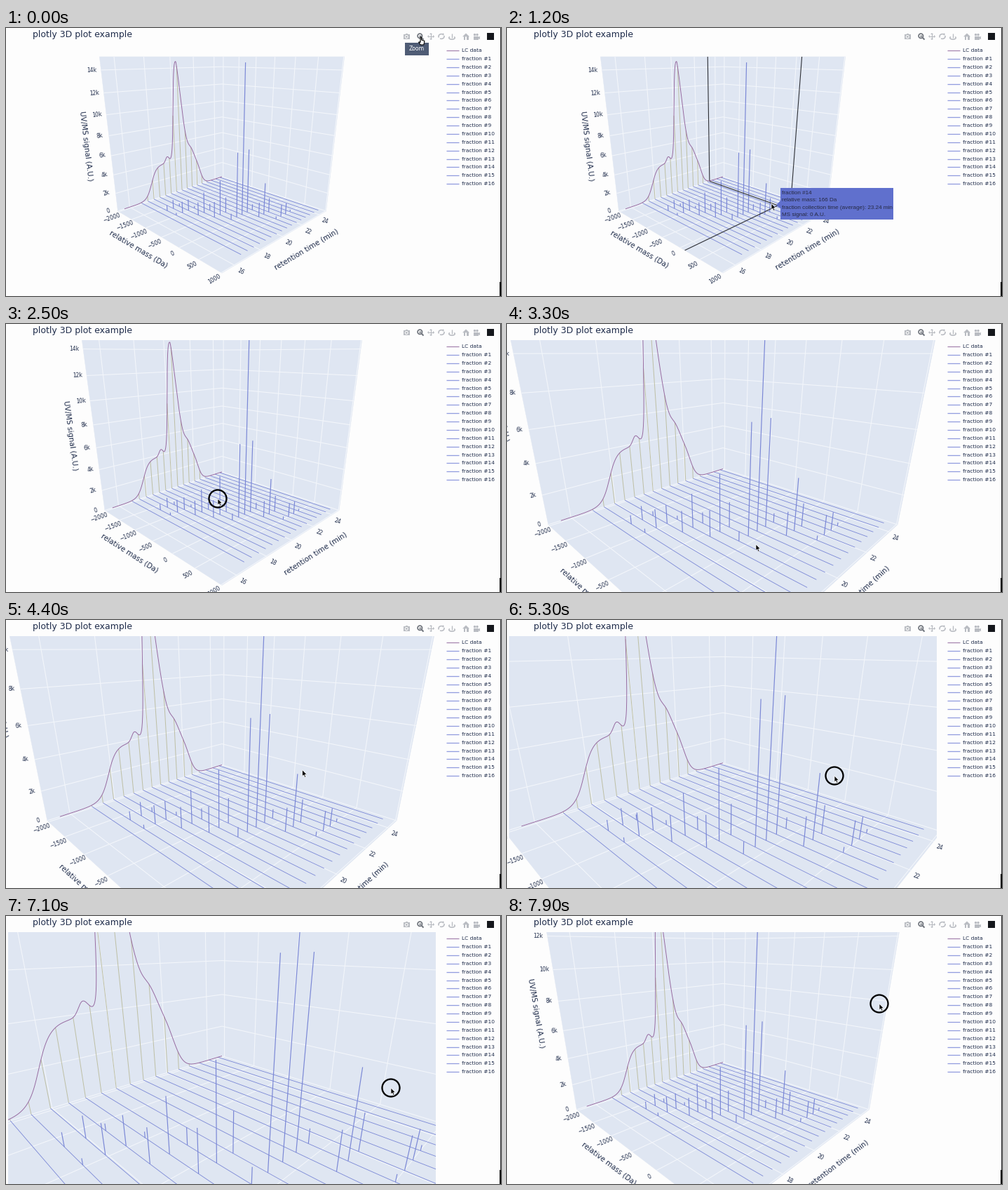
A matplotlib script for the animation above (8 s loop, 706 by 382 pixels).

```python
import numpy as np
import matplotlib.pyplot as plt
from matplotlib.animation import FuncAnimation
from matplotlib.collections import LineCollection
from matplotlib.patches import Circle, Polygon, Rectangle

W, H, DPI = 706, 382, 100
STEP, LOOP = 100, 8000
PX = 72 / DPI
plt.rcParams["font.family"] = "DejaVu Sans"

INK, PAPER, WALL, GRID = "#1f2c4b", "#fdfdfd", "#dfe6f2", "#f3f6fb"
BLUE, PURPLE, OLIVE = "#7b88d6", "#95689f", "#bec0a6"
ICON, ACTIVE = "#b9bcc2", "#70757d"

# Camera: fixed direction, moved along its axis by vertical drags
CX, CY, FOCAL = 308, 224, 485
PITCH = np.arctan(183 / FOCAL)
SIN, COS = np.sin(PITCH), np.cos(PITCH)
FAR, ZOOM_RATE, TARGET_Z, TOP = 2.243, .0064, .188, .98

# Cursor path (ms, x, y), drag spans and hover span (ms)
PATH = np.array([
    (100, 591, 13), (1000, 377, 250), (1700, 377, 250), (1900, 294, 230),
    (2500, 302, 249), (3200, 355, 314), (3700, 355, 314), (4600, 442, 185),
    (5300, 467, 222), (5500, 467, 222), (6500, 535, 191), (7100, 549, 245),
    (7900, 531, 125)]).T
DRAGS = [(1900, 3200), (4600, 5400), (6500, LOOP)]
HOVER = (1000, 1700)


def cursor(ms):
    return np.array([np.interp(ms, PATH[0], c) for c in PATH[1:]])


def distance(ms):
    dragged = sum(cursor(np.clip(ms, a, b))[1] - cursor(a)[1]
                  for a, b in DRAGS)
    return FAR * np.exp(-ZOOM_RATE * dragged)


def project(p, d):
    """Map (mass, time, signal) box positions to stage pixels."""
    m, t, z = np.moveaxis(np.asarray(p, float), -1, 0)
    right, near, up = (m + t) / 2**.5, (m - t) / 2**.5, z - TARGET_Z
    depth = d - near * COS - up * SIN
    x = CX + FOCAL * right / depth
    y = CY - FOCAL * (up * COS - near * SIN) / depth
    return np.stack([x, y], -1)


def mass_pos(v):
    return .209 + .000327 * (v - 123)


def time_pos(v):
    return .337 + .103 * (v - 23.24)


def signal_pos(v):
    return .0648 * v


def bell(x, mid, width, power=2):
    return np.exp(-np.abs((x - mid) / width)**power)


def lc_signal(t):
    """Broad plateau, a sharp skewed peak and two small shoulders."""
    t = t - .005
    plateau = .25 / (1 + np.exp(-(t + .222) / .025))
    plateau /= 1 + np.exp((t - .24) / .022)
    peak = np.where(t < .044, bell(t, .044, .052, 2.5),
                    bell(t, .044, .0517, 1.5))
    return (plateau + .7 * peak + .045 * bell(t, -.072, .023)
            + .05 * bell(t, .155, .035))


# Scene data in box coordinates
FRACTIONS = -.312 + .0525 * np.arange(16)
ts = np.linspace(-.45, .5, 400)
TRACE = np.stack([np.full_like(ts, -.5), ts, lc_signal(ts)], -1)
DROPS = [[(-.5, t, 0), (-.5, t, lc_signal(t))] for t in FRACTIONS]
BASES = [[(-.5, t, 0), (.455, t, 0)] for t in FRACTIONS]

# Each species elutes as a bell over neighbouring fractions
ELUTION = [1.8, 2.5, 3.8, 5, 7, 9, 10.45]
HEIGHT = [.065, .1, .15, .238, .95, .22, .1]
PEAKS = []
for k, (mid, top) in enumerate(zip(ELUTION, HEIGHT)):
    m = .033 + .1 * (k - 3)
    for i, t in enumerate(FRACTIONS):
        z = top * bell(i, mid, 1.13)
        if z > .014:
            PEAKS.append([(m, t, 0), (m, t, z)])


def mass_line(m):
    return [[(m, -.5, 0), (m, .5, 0)], [(m, .5, 0), (m, .5, TOP)]]


def time_line(t, end=.5):
    return [[(-.5, t, 0), (end, t, 0)], [(-.5, t, 0), (-.5, t, TOP)]]


def signal_line(z):
    return [[(-.5, -.5, z), (-.5, .5, z)], [(-.5, .5, z), (.5, .5, z)]]


MASSES, TIMES, SIGNALS = range(-2000, 1001, 500), range(16, 25, 2), range(0, 15, 2)
MESH = (sum((mass_line(mass_pos(v)) for v in MASSES), [])
        + sum((time_line(time_pos(v)) for v in TIMES), [])
        + sum((signal_line(signal_pos(v)) for v in SIGNALS), []))
GUIDES = mass_line(.208) + time_line(.34, .208)

square = np.array([(-.5, -.5), (.5, -.5), (.5, .5), (-.5, .5)])
FACES = [np.c_[square, np.zeros(4)],
         np.c_[np.full(4, -.5), square * (1, TOP) + (0, TOP / 2)],
         np.c_[square[:, 0], np.full(4, .5), square[:, 1] * TOP + TOP / 2]]

fig = plt.figure(figsize=(W / DPI, H / DPI), dpi=DPI, facecolor=PAPER)
ax = fig.add_axes([0, 0, 1, 1])
ax.set_xlim(0, W)
ax.set_ylim(H, 0)
ax.axis("off")
scene = ax.add_patch(Rectangle((3, 23), 610, 360, fc="none", ec="none"))


def clipped(artist):
    artist.set_clip_path(scene)
    return artist


def line(x, y, color, lw=1.0, z=5):
    return ax.plot(x, y, color=color, lw=lw * PX, zorder=z,
                   solid_capstyle="butt")[0]


def label(x, y, s, size, color=INK, z=5, **kw):
    return ax.text(x, y, s, fontsize=size * PX, color=color, zorder=z,
                   va="center", **kw)


def box(x, y, w, h, color, z=5):
    return ax.add_patch(Rectangle((x, y), w, h, fc=color, ec="none", zorder=z))


def shape(pts, color, z=5, ec="none", lw=0.0):
    return ax.add_patch(Polygon(pts, closed=True, fc=color, ec=ec,
                                lw=lw * PX, zorder=z))


def disc(x, y, r, color=ICON, ec="none", lw=0.0, z=5):
    return ax.add_patch(Circle((x, y), r, fc=color, ec=ec, lw=lw * PX,
                               zorder=z))


def arc(x, y, rx, ry, start, stop, color=ICON):
    a = np.linspace(start, stop, 24)
    line(x + rx * np.cos(a), y - ry * np.sin(a), color, 1.6)


def segments(data, color, lw, z):
    coll = LineCollection([], colors=color, linewidths=lw * PX, zorder=z)
    ax.add_collection(coll, autolim=False)
    return clipped(coll), data


# Scene layers
faces = [clipped(shape(square, WALL, 1, WALL, .4)) for _ in FACES]
layers = [segments(MESH, GRID, 1.1, 2), segments(DROPS, OLIVE, 1, 3),
          segments(BASES, BLUE, .85, 3), segments(PEAKS, BLUE, 1.2, 4),
          segments(GUIDES, "#2b2d33", 1.1, 4)]
guides = layers[-1][0]
trace = clipped(line([], [], PURPLE, .95, 4))

# Axis texts run along a box direction, shifted by a pixel offset
MASS_DIR, TIME_DIR, DOWN = np.diag([.02, .02, -.02])
texts = []


def axis_text(s, size, at, along, off):
    t = clipped(label(0, 0, s, size, ha="center", z=4))
    texts.append((t, [at, at + along], off))


for v in MASSES:
    axis_text(str(v).replace("-", "\u2212"), 7.6, (mass_pos(v), -.5, 0),
              TIME_DIR, (-10, 9))
for v in TIMES:
    axis_text(str(v), 7.6, (.5, time_pos(v), 0), MASS_DIR, (8, 9))
for v in SIGNALS:
    axis_text(f"{v}k" if v else "0", 7.6, (-.5, -.5, signal_pos(v)),
              TIME_DIR, (-13, 0))
axis_text("UV/MS signal (A.U.)", 10.4, (-.5, -.5, .49), DOWN, (-34, 8))
axis_text("relative mass (Da)", 10.3, (0, -.5, 0), MASS_DIR, (-32, 18))
axis_text("retention time (min)", 10.3, (.5, 0, 0), TIME_DIR, (34, 18))

# Title, legend, window edge
label(38, 10, "plotly 3D plot example", 12.56)
for i in range(17):
    y = 32.2 + 11.87 * i
    line([628, 646], [y, y], "#929ddf" if i else "#a887b2", 1.3)
    label(650, y, f"fraction #{i}" if i else "LC data", 7.5)
box(704.5, 0, 1.5, H, "#2c2c2e")
box(704, 362, 2, 20, "black")

# Toolbar: camera, zoom, pan, orbit, turntable, home, video, logo
box(566.5, 9, 9.5, 7, ICON)
box(569.5, 7.8, 3.5, 2, ICON)
disc(571.2, 12.5, 2, ICON, PAPER, 1)
disc(590.3, 11.3, 3.2, "none", ACTIVE, 1.7)
line([592.6, 595.5], [13.6, 16.6], ACTIVE, 2)
line([588.5, 592], [11.3, 11.3], ACTIVE)
line([590.3, 590.3], [9.5, 13], ACTIVE)
tip = np.array([(5, 0), (3, 2), (3, -2)])
for a in np.arange(4) * np.pi / 2:
    c, s = np.cos(a), np.sin(a)
    shape(tip @ [[c, s], [-s, c]] + (606, 12), ICON)
    line([606, 606 + 4 * c], [12, 12 + 4 * s], ICON, 1.2)
arc(621, 12, 4, 3.4, 1, 3.6)
arc(621, 12, 4, 3.4, 4.2, 6.6)
shape(tip + (620, 9), ICON)
line([636, 636], [7.5, 14], ICON, 1.4)
arc(636, 14, 4.2, 2.2, 2.4, 7)
shape([(651, 12.3), (656, 7.5), (661, 12.3)], ICON)
box(652.5, 12, 2.5, 4.5, ICON)
box(657, 12, 2.5, 4.5, ICON)
box(666.5, 11.5, 7, 5, ICON)
shape([(673, 14), (676, 11.5), (676, 16.5)], ICON)
disc(668.5, 9.6, 1.7)
disc(672, 9.6, 1.7)
box(686, 7, 10, 10, "#15171c")

# Toolbar hint with hand
HAND = np.array([(0, 0), (1.4, 0), (1.7, 4), (6, 5.5), (4.8, 11), (.2, 11),
                 (-2.6, 7), (0, 7.5)])
hint = [box(569, 21, 33.5, 17.5, "#4f5c75", 7),
        shape([(588, 21.2), (591, 18), (594, 21.2)], "#4f5c75", 7),
        label(585.7, 29.5, "Zoom", 7.8, "white", 8, ha="center"),
        shape(HAND + (591, 13), "white", 9, "black", 1.1)]

# Hover card
CARD = ["fraction #14", "relative mass: 166 Da",
        "fraction collection time (average): 23.24 min", "MS signal: 0 A.U."]
card = [box(390, 228, 161, 44.5, "#6070cd", 6),
        shape([(390, 246), (384, 252.5), (390, 257)], "#6070cd", 6)]
card += [label(392, 235.5 + 10.4 * i, s, 8.1, "#262a45", 7,
               family="Liberation Sans") for i, s in enumerate(CARD)]

# Pointer
ARROW = np.array([(0, 0), (0, 9), (2, 7.2), (3.5, 10.6), (5, 9.9),
                  (3.6, 6.7), (6.3, 6.5)])
arrow = shape(ARROW, "black", 9, "white", .7)
ring = disc(0, 0, 12.5, "none", "black", 2.3, 8)


def draw(i):
    now = i * STEP
    pos, d = cursor(now), distance(now)

    for patch, corners in zip(faces, FACES):
        patch.set_xy(project(corners, d))
    for coll, data in layers:
        coll.set_segments(list(project(data, d)))
    trace.set_data(*project(TRACE, d).T)
    for t, ends, off in texts:
        p, q = project(ends, d)
        t.set_position(p + off)
        t.set_rotation(-np.degrees(np.arctan2(*(q - p)[::-1])))

    for artist in card + [guides]:
        artist.set_visible(HOVER[0] <= now <= HOVER[1])
    for artist in hint:
        artist.set_visible(now <= 100)
    arrow.set_visible(now > 100)
    arrow.set_xy(ARROW + pos)
    ring.set_visible(any(a <= now < b for a, b in DRAGS))
    ring.center = pos
    return []


anim = FuncAnimation(fig, draw, frames=LOOP // STEP, interval=STEP,
                     repeat=True, repeat_delay=0, blit=False)
plt.show()
```
